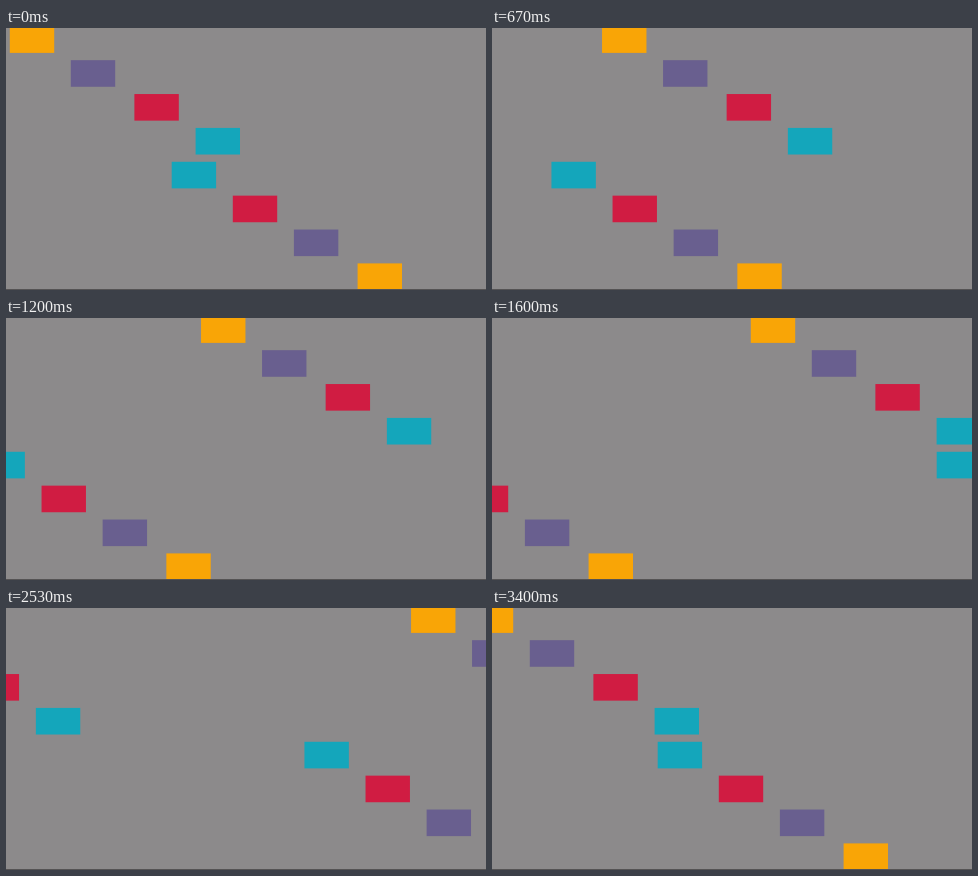
An HTML page for the animation above (3470 ms loop, 480 by 262 pixels).

```html
<!DOCTYPE html>
<html lang="en">
<head>
<meta charset="utf-8">
<title>Sliding blocks</title>
<style>
  html, body { margin: 0; width: 100%; height: 100%; overflow: hidden; background: #8c8a8b; }
  svg { display: block; width: 480px; height: 262px; }
</style>
</head>
<body>
<svg id="stage" viewBox="0 0 480 262" xmlns="http://www.w3.org/2000/svg"></svg>
<script>
  const LOOP = 3470;
  const YELLOW = '#f9a506', PURPLE = '#695f8f', RED = '#d01c42', TEAL = '#14a6bb';
  const stage = document.getElementById('stage');

  function addRect(x, y, width, height, fill) {
    const el = document.createElementNS(stage.namespaceURI, 'rect');
    const attrs = { x, y, width, height, fill };
    for (const key in attrs) el.setAttribute(key, attrs[key]);
    stage.appendChild(el);
    return el;
  }

  // Start x, colour and direction of each row, top to bottom
  const blocks = [
    [3.8, YELLOW, 1], [64.8, PURPLE, 1], [128.4, RED, 1], [189.6, TEAL, 1],
    [165.7, TEAL, -1], [226.8, RED, -1], [287.9, PURPLE, -1], [351.6, YELLOW, -1]
  ].map(([start, fill, dir], row) => ({
    start, dir, el: addRect(start, -1.7 + 33.87 * row, 44.4, 26.6, fill)
  }));
  addRect(0, 261, 480, 1, '#555354');

  const wrap = (x, min, span) => ((x - min) % span + span) % span + min;

  // Distance travelled; the last part runs slightly slower
  const travel = step => step < 32 ? step * 10.625 : 340 + (step - 32) * 194 / 19;

  function draw() {
    const time = Math.floor(performance.now() % LOOP / 10) * 10;
    const step = Math.min(51, Math.floor((time + 4) * 0.015));
    const shift = travel(step);
    for (const { start, dir, el } of blocks) {
      const x = start + dir * shift;
      el.setAttribute('x', dir > 0 ? wrap(x, -81, 561) : wrap(x, -45, 534));
    }
    requestAnimationFrame(draw);
  }
  draw();
</script>
</body>
</html>
```
